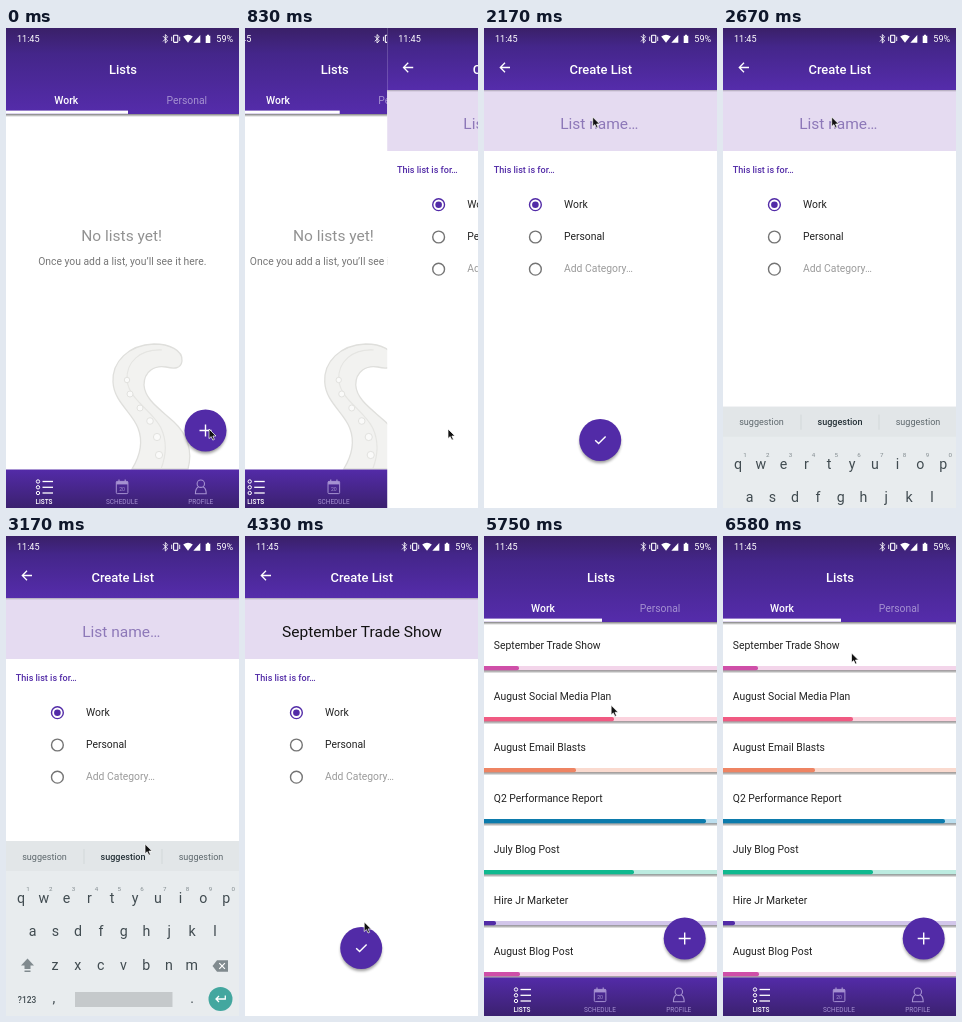
An HTML page that plays this animation: 233x480 px, repeating every 8010 ms.

```html
<!DOCTYPE html>
<html lang="en">
<head>
<meta charset="utf-8">
<title>List app walkthrough</title>
<style>
  html, body { margin: 0; width: 100%; height: 100%; overflow: hidden; background: #fff; }
  svg { display: block; width: 100vw; height: 100vh; }
  text { font-family: Roboto, sans-serif; }
</style>
</head>
<body>
<svg id="stage" viewBox="0 0 233 480"></svg>
<script>
const LOOP = 8010, FRAME = 1000 / 12;
const PURPLE = '#522ba7', PALE = '#a591d1', INK = '#222';

// Markup helpers; text is placed by the middle of its capitals
const rect = (x, y, w, h, fill, more = '') =>
  `<rect x="${x}" y="${y}" width="${w}" height="${h}" fill="${fill}" ${more}/>`;
const circle = (x, y, r, more) => `<circle cx="${x}" cy="${y}" r="${r}" ${more}/>`;
const line = (d, color, width = 1, more = '') =>
  `<path d="${d}" fill="none" stroke="${color}" stroke-width="${width}" ${more}/>`;
const shape = (d, fill, more = '') => `<path d="${d}" fill="${fill}" ${more}/>`;
const text = (s, x, y, size, fill, anchor = 'start', weight = 400) =>
  `<text x="${x}" y="${y + size * 0.355}" font-size="${size}" fill="${fill}" ` +
  `text-anchor="${anchor}" font-weight="${weight}">${s}</text>`;
const group = (id, body) => `<g id="${id}">${body}</g>`;

const defs = `<defs>
  <linearGradient id="head" x2="0" y2="1">
    <stop stop-color="#3a2068"/><stop offset=".3" stop-color="#44268a"/><stop offset="1" stop-color="#552cab"/>
  </linearGradient>
  <linearGradient id="foot" x2="0" y2="1">
    <stop stop-color="#532ba8"/><stop offset="1" stop-color="#3b216f"/>
  </linearGradient>
  <linearGradient id="shade" x2="0" y2="1">
    <stop stop-color="#000" stop-opacity=".5"/><stop offset="1" stop-color="#000" stop-opacity="0"/>
  </linearGradient>
  <filter id="soft" x="-30%" y="-30%" width="160%" height="160%"><feGaussianBlur stdDeviation="1.8"/></filter>
</defs>`;

function statusBar() {
  return text('11:45', 11, 10.7, 9.06, '#fff') +
    line('M157 8.2L161.6 12.8 159.3 15V6.6L161.6 8.8 157 13.4', '#fff', 0.9) +
    rect(167.6, 7.2, 4.2, 7.2, 'none', 'rx=".6" stroke="#fff" stroke-width="1.1"') +
    line('M165.7 8.7V13M173.7 8.7V13', '#fff', 0.9) +
    shape('M177.2 8.5Q182 4.9 186.8 8.5L182 14.8Z', '#fff') +
    shape('M187.3 14.7L194.3 7V14.7Z', '#fff') +
    shape('M199.7 7.8H201V6.8H203V7.8H204.3V14.9H199.7Z', '#fff') +
    text('59%', 210.3, 10.7, 9.06, '#fff');
}

function fab(x, y, icon) {
  return circle(x, y + 2.5, 20.5, 'fill="#000" opacity=".4" filter="url(#soft)"') +
    circle(x, y, 21, `fill="${PURPLE}"`) + line(icon, '#fff', 1.4);
}
const plusFab = x => fab(x, 402.5, `M${x - 6} 402.5h12M${x} 396.5v12`);

function navBar() {
  const dots = [453.5, 459.3, 465].map(y =>
    circle(32, y, 1.7, 'fill="none" stroke="#fff"') + line(`M36.5 ${y}H47`, '#fff', 1.3)).join('');
  const label = (s, x, color, weight) => text(s, x, 473.5, 6.47, color, 'middle', weight);
  return rect(0, 441.5, 233, 38.5, 'url(#foot)') + dots +
    rect(110.3, 453.4, 11.6, 12.2, 'none', `rx="1" stroke="${PALE}"`) +
    rect(110.3, 453.4, 11.6, 3, PALE) + line('M113 451.5v2.5M119.2 451.5v2.5', PALE, 1.2) +
    text('20', 116.1, 461.3, 5.2, PALE, 'middle') +
    circle(194.8, 455.7, 3.7, `fill="none" stroke="${PALE}" stroke-width="1.1"`) +
    line('M192.4 459Q189.4 460.4 189.4 465.8H200.2Q200.2 460.4 197.2 459', PALE, 1.1) +
    label('LISTS', 38, '#fff', 500) + label('SCHEDULE', 116, PALE, 400) + label('PROFILE', 194.8, PALE, 400);
}

function tabs(workX, personalX, barWidth) {
  return rect(0, 86, 233, 3, 'url(#shade)') + rect(0, 0, 233, 86, 'url(#head)') + statusBar() +
    text('Lists', 117, 41, 12.94, '#fff', 'middle', 500) +
    text('Work', workX, 72.7, 10.36, '#fff', 'middle', 500) +
    text('Personal', personalX, 72.7, 10.36, PALE, 'middle') +
    rect(0, 82.6, barWidth, 3.2, '#fff');
}

function tentacle() {
  const suckers = [[119, 352, 4.5], [122, 366, 5], [132, 380, 5], [142, 393, 5.5], [149, 409, 6], [151, 427, 6]];
  return shape('M176 333C177 322 163 316 148 316C122 317 106 334 107 354C108 374 126 384 132 400C137 413 134 428 126 441' +
      'H182C187 423 181 406 168 394C154 381 139 372 138 357C138 343 149 337 160 339C168 341 175 341 176 333Z',
      '#f2f2f0', 'stroke="#dfdfdc" stroke-width="1.3"') +
    line('M156 322C134 321 120 334 121 352C123 372 146 382 155 400C161 413 160 428 155 441', '#e5e5e2', 1.2) +
    suckers.map(([x, y, r]) => circle(x + 2, y, r * 0.6, 'fill="#fafaf9" stroke="#e2e2df"')).join('');
}

function emptyScreen() {
  return rect(0, 0, 233, 480, '#fff') + tabs(60.3, 180.8, 122) +
    text('No lists yet!', 115.7, 207, 15.53, '#929292', 'middle') +
    text('Once you add a list, you’ll see it here.', 116.3, 233.3, 10.36, '#777', 'middle') +
    tentacle() + plusFab(199.5) + navBar();
}

function createScreen() {
  const radio = (y, label, on) =>
    circle(51.4, y + 0.7, 5.9, `fill="none" stroke="${on ? PURPLE : '#747474'}" stroke-width="1.4"`) +
    (on ? circle(51.4, y + 0.7, 3.3, `fill="${PURPLE}"`) : '') +
    text(label, 80, y, 10.36, label.startsWith('Add') ? '#9b9b9b' : INK);
  return rect(0, 0, 233, 480, '#fff') + rect(0, 62, 233, 61, '#e5dbf1') +
    rect(0, 62, 233, 2, 'url(#shade)', 'opacity=".5"') +
    rect(0, 0, 233, 62, 'url(#head)') + statusBar() +
    line('M26 39.5H16.5M21 34.8L16.3 39.5 21 44.2', '#fff', 1.3) +
    text('Create List', 116.8, 41, 12.94, '#fff', 'middle', 500) +
    group('hint', text('List name…', 115.3, 95, 15.53, '#8d78b8', 'middle')) +
    group('name', text('September Trade Show', 117, 95, 15.53, '#111', 'middle')) +
    text('This list is for…', 9.8, 141.5, 9.06, PURPLE, 'start', 500) +
    radio(176, 'Work', true) + radio(208.3, 'Personal') + radio(240.5, 'Add Category…') +
    fab(116.2, 412, 'M111.2 412.2L114.6 415.6 121.6 408.4');
}

function listScreen() {
  const rows = [
    ['September Trade Show', 35, '#cf4fa8', '#f3d5ea'],
    ['August Social Media Plan', 130, '#f05a82', '#fbd3de'],
    ['August Email Blasts', 92, '#ee8463', '#fadacf'],
    ['Q2 Performance Report', 222, '#0c7bac', '#bcdeee'],
    ['July Blog Post', 150, '#10b98f', '#bcebe0'],
    ['Hire Jr Marketer', 12, PURPLE, '#d2c6ea'],
    ['August Blog Post', 36, '#cf4fa8', '#f3d5ea']
  ];
  const body = rows.map(([label, done, color, rest], i) => {
    const y = 130 + 51 * i;
    return text(label, 9.8, y - 21, 10.36, INK) + rect(0, y + 4, 233, 3.5, 'url(#shade)') +
      rect(0, y, 233, 4.2, rest) + rect(-4, y, done + 4, 4.2, color, 'rx="2"');
  }).join('');
  return rect(0, 0, 233, 480, '#fff') + body + tabs(59, 176, 118) + plusFab(200.7) + navBar();
}

function keyboard() {
  const KEY = '#404b50', GREY = '#808a8e';
  const row = (keys, x, y) => [...keys].map((k, i) => text(k, x + 22.8 * i, y, 14.2, KEY, 'middle')).join('');
  const digits = [...'1234567890'].map((d, i) => text(d, 22 + 22.8 * i, 353, 6.2, GREY, 'middle')).join('');
  return rect(0, 305, 233, 175, '#e8ecee') + rect(0, 305, 233, 30, '#e2e6e8') +
    line('M78 313v15M156 313v15', '#ccd1d3', 0.7) +
    text('suggestion', 38.5, 320.5, 9.06, '#5e686d', 'middle') +
    text('suggestion', 117, 320.5, 9.06, '#263238', 'middle', 500) +
    text('suggestion', 195, 320.5, 9.06, '#5e686d', 'middle') +
    digits + row('qwertyuiop', 15, 362) + row('asdfghjkl', 26.5, 395) + row('zxcvbnm', 49, 428.5) +
    shape('M21.5 422.5L28 429.5H24.5V433H18.5V429.5H15ZM18.5 434.5h6v1.6h-6Z', GREY) +
    shape('M206.5 430L211 424.3H222V435.7H211Z', GREY) +
    line('M213.3 427.2l5.6 5.6M218.9 427.2l-5.6 5.6', '#fff', 1.2) +
    text('?123', 21, 464, 8.4, KEY, 'middle', 500) + text(',', 48, 462, 14, KEY, 'middle') +
    rect(69, 456, 97.5, 15, '#c5c9cb') + text('.', 186, 462, 14, KEY, 'middle') +
    circle(214.5, 463, 12, 'fill="#43a79f"') +
    line('M219.3 459.5V463H210M213 460L210 463 213 466', '#fff', 1.3);
}

const stage = document.getElementById('stage');
stage.innerHTML = defs + group('empty', emptyScreen()) +
  group('create', createScreen() + group('keys', keyboard())) + group('list', listScreen()) +
  group('cursor', shape('M0 0V9.6L2.2 7.6 3.8 11.1 5.4 10.4 3.9 7H7Z', '#111', 'stroke="#fff" stroke-width=".7"'));

const parts = {};
for (const id of ['empty', 'create', 'hint', 'name', 'keys', 'list', 'cursor'])
  parts[id] = document.getElementById(id);

const span = (t, a, b) => Math.min(1, Math.max(0, (t - a) / (b - a)));
const easeOut = (p, n = 3) => 1 - (1 - p) ** n;
const easeInOut = p => p < 0.5 ? 4 * p ** 3 : 1 - (2 - 2 * p) ** 3 / 2;
const move = (el, x, y) => el.setAttribute('transform', `translate(${x.toFixed(2)} ${y.toFixed(2)})`);
const fade = (el, a) => {
  el.setAttribute('opacity', a.toFixed(3));
  el.style.display = a > 0 ? '' : 'none';
};

// Pointer moves: start, end, target x, target y, sideways bow
const moves = [
  [1417, 2167, 108.7, 89, 0],
  [2750, 3330, 142, 329.6, 0],
  [3917, 4600, 121, 403.5, -10],
  [5000, 6167, 128.5, 117, 0]
];

function pointer(t) {
  let x = 203, y = 401;
  for (const [a, b, tx, ty, bow] of moves) {
    const p = easeInOut(span(t, a, b));
    x += (tx - x) * p + bow * Math.sin(Math.PI * p);
    y += (ty - y) * p;
  }
  return [x, y];
}

function draw(t) {
  const push = easeOut(span(t, 750, 1333), 3.2);
  move(parts.empty, -70 * push, 0);
  move(parts.create, 233 * (1 - push), 0);

  const swap = span(t, 3417, 3750);
  move(parts.keys, 0, 175 * (1 - easeOut(span(t, 2583, 2917))));
  fade(parts.keys, t < 2600 ? 0 : 1 - swap);
  fade(parts.hint, 1 - swap);
  fade(parts.name, swap);

  fade(parts.list, span(t, 4750, 5000));
  move(parts.cursor, ...pointer(t));
}

const start = performance.now();
function tick() {
  const t = Math.max(0, performance.now() - start) % LOOP;
  draw(Math.floor((t + 4) / FRAME) * FRAME);
  requestAnimationFrame(tick);
}
tick();
</script>
</body>
</html>
```
